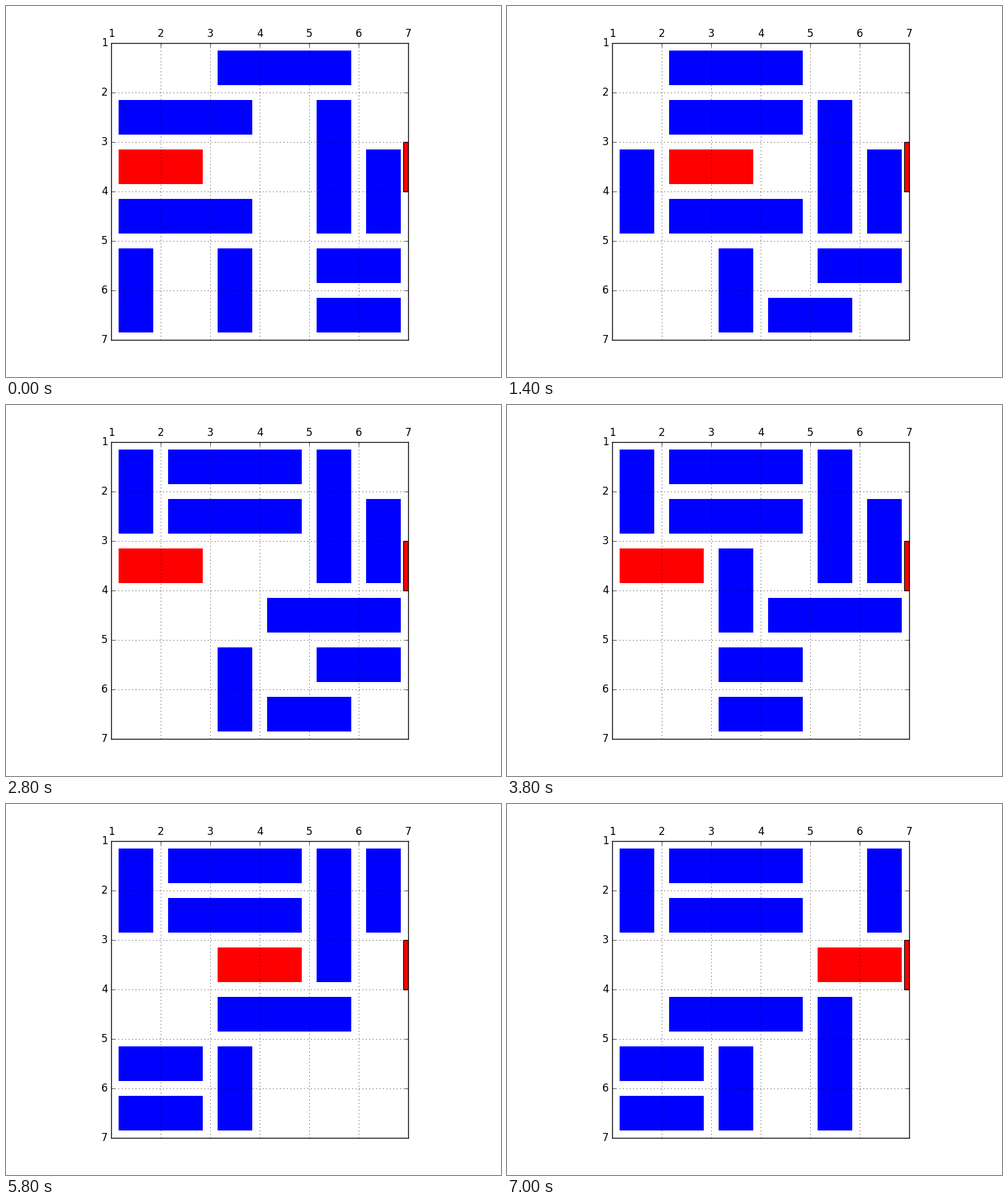
These frames come from a looping animation (800 px wide and 600 px high, 7200 ms). A matplotlib script:

```python
import matplotlib.pyplot as plt
from matplotlib.animation import FuncAnimation
from matplotlib.patches import Rectangle

plt.style.use("classic")
plt.rcParams.update({
    "font.family": "DejaVu Sans",
    "figure.dpi": 100,
    "savefig.dpi": 100,
    "figure.facecolor": "white",
    "savefig.facecolor": "white",
})

SIZE = 6
STEP_MS = 200
MARGIN = 0.15

# name: (column, row, length, orientation)
CARS = {
    "A": (3, 1, 3, "h"),
    "B": (1, 2, 3, "h"),
    "R": (1, 3, 2, "h"),
    "C": (1, 4, 3, "h"),
    "D": (1, 5, 2, "v"),
    "E": (3, 5, 2, "v"),
    "F": (5, 2, 3, "v"),
    "G": (6, 3, 2, "v"),
    "H": (5, 5, 2, "h"),
    "I": (5, 6, 2, "h"),
}

# One cell per step: + is right or down, - is left or up.
MOVES = """
    C+ R+ B+ A- I- D- D-
    D- F- D- C+ R- G- C+
    E- E- H- I- H-
    H- I- H- G- E+
    I- R+ E+ R+ C-
    C- F+ F+ F+ R+ R+
""".split()


def corner(name, shift):
    col, row, _, way = CARS[name]
    if way == "h":
        col += shift
    else:
        row += shift
    return col + MARGIN, row + MARGIN


def make_car(name):
    _, _, length, way = CARS[name]
    long_side, short_side = length - 2 * MARGIN, 1 - 2 * MARGIN
    w, h = (long_side, short_side) if way == "h" else (short_side, long_side)
    color = "#ff0000" if name == "R" else "#0000ff"
    return Rectangle(corner(name, 0), w, h, facecolor=color, edgecolor="none")


fig = plt.figure(figsize=(8, 6))
ax = fig.add_axes([170 / 800, 0.1, 0.6, 0.8])
ax.set_xlim(1, SIZE + 1)
ax.set_ylim(SIZE + 1, 1)
ax.set_xticks(range(1, SIZE + 2))
ax.set_yticks(range(1, SIZE + 2))
ax.xaxis.tick_top()
ax.grid(True)

# Exit on the right wall
ax.add_patch(Rectangle((SIZE + 0.9, 3), 0.1, 1, facecolor="#ff0000",
                       edgecolor="black", linewidth=1))
cars = {name: ax.add_patch(make_car(name)) for name in CARS}


def draw(step):
    shifts = dict.fromkeys(CARS, 0)
    for name, sign in MOVES[:step]:
        shifts[name] += 1 if sign == "+" else -1
    for name, car in cars.items():
        car.set_xy(corner(name, shifts[name]))
    return list(cars.values())


anim = FuncAnimation(fig, draw, frames=len(MOVES) + 1, interval=STEP_MS,
                     init_func=lambda: draw(0), repeat=True, repeat_delay=0)
plt.show()
```
